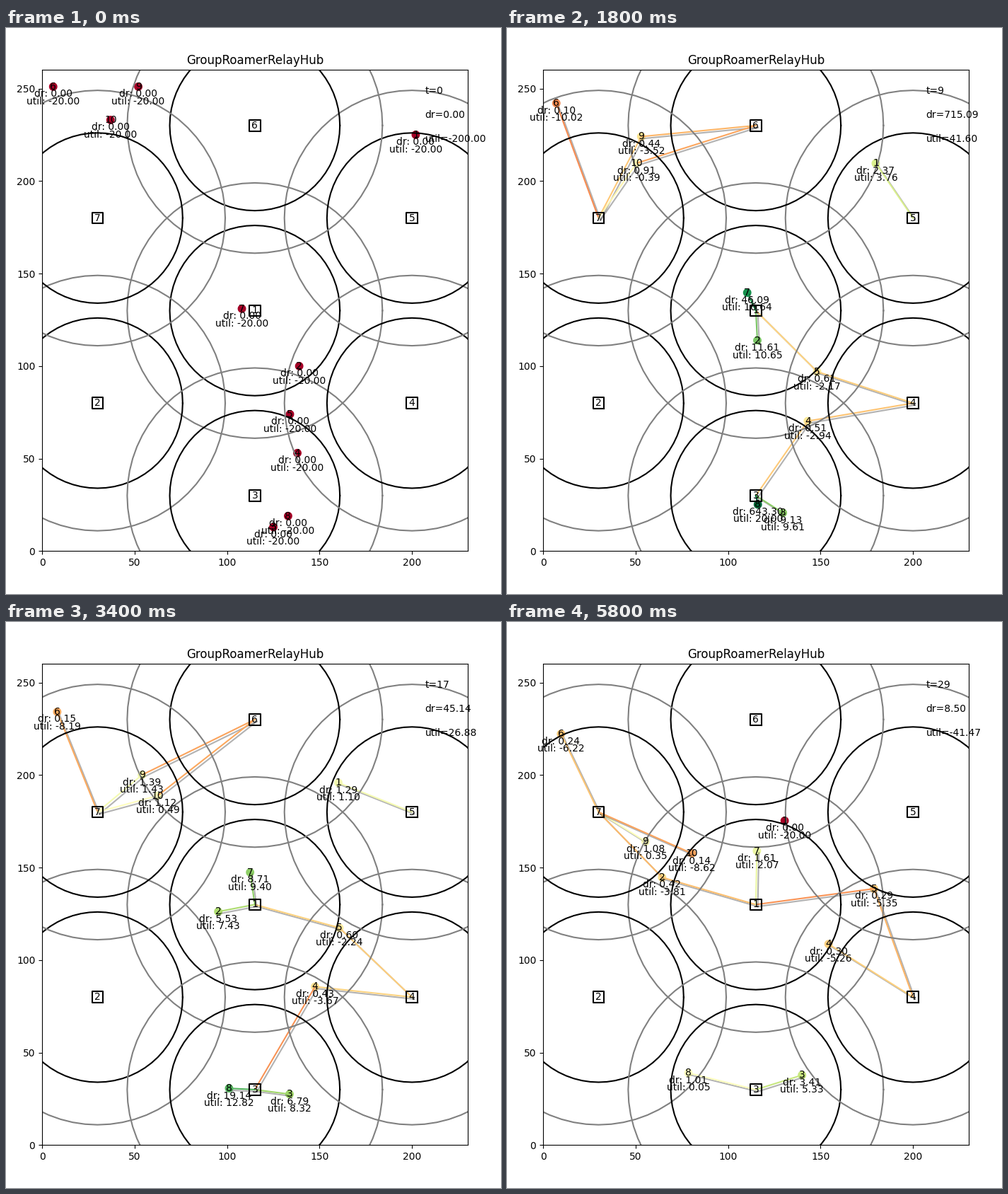
A matplotlib script that plays this animation: 700x800 px, repeating every 6 s.

```python
import math

import matplotlib.pyplot as plt
import numpy as np
from matplotlib import patheffects as pe
from matplotlib.animation import FuncAnimation

W, H, STEPS = 700, 800, 30
PAUSE = 2  # steps a user rests at a waypoint

# one cell in the middle, six around it on a hexagon
CELLS = {1: (115, 130)}
for k in range(6):
    a = math.radians(210 + 60 * k)
    CELLS[k + 2] = (115 + 85 * math.cos(a) / math.cos(math.pi / 6),
                    130 + 100 * math.sin(a))

# id: (waypoints, cells the user may join)
USERS = {
    1: ([(202, 225), (130.6, 175.29)], {5}),
    2: ([(139, 100), (64.34, 144.67)], {1, 7}),
    3: ([(125, 13), (139.98, 37.83)], {3}),
    4: ([(138, 53), (154.33, 108.65)], {3, 4}),
    5: ([(134, 74), (166, 126), (178.88, 138.57)], {1, 4}),
    6: ([(6, 251), (9.69, 222.24)], {7}),
    7: ([(108, 131), (115.59, 158.99)], {1}),
    8: ([(133, 19), (78.55, 38.99)], {3}),
    9: ([(52, 251), (55.36, 164.07)], {6, 7}),
    10: ([(37, 233), (80.47, 157.64)], {6, 7}),
}

# radio model: Okumura-Hata path loss
FREQ, MAST, PHONE = 2500, 50, 1.5
POWER, NOISE, BAND = 30, 1e-9, 9e6
MIN_SNR = 2e-8


def snr(dist):
    lf, lh = math.log10(FREQ), math.log10(MAST)
    corr = 0.8 + (1.1 * lf - 0.7) * PHONE - 1.56 * lf
    loss = (69.55 + 26.16 * lf - 13.82 * lh - corr
            + (44.9 - 6.55 * lh) * math.log10(dist))
    return 10 ** ((POWER - loss) / 10) / NOISE


def utility(rate):
    return min(20, max(-20, 10 * math.log10(rate))) if rate > 0 else -20


def position(uid, t):
    """Walk from waypoint to waypoint at a whole-number speed."""
    points = USERS[uid][0]
    legs = [(p, q, math.dist(p, q)) for p, q in zip(points, points[1:])]
    speed = round(sum(leg[2] for leg in legs) / (STEPS - 1))
    for p, q, length in legs:
        f = min(1, speed * t / length)
        spent = math.ceil(length / speed) + PAUSE
        if t <= spent:
            break
        t -= spent
    return p[0] + f * (q[0] - p[0]), p[1] + f * (q[1] - p[1])


def link_snr(uid, cell, t):
    return snr(math.dist(position(uid, t), CELLS[cell]))


def simulate():
    """For every step: {user: {cell: data rate}}."""
    links = {u: set() for u in USERS}
    history = []
    for t in range(STEPS):
        for u, (_, allowed) in USERS.items():
            if t > 0:
                # one new cell per step, strongest first
                free = [c for c in allowed - links[u]
                        if link_snr(u, c, t - 1) > MIN_SNR]
                if free:
                    links[u].add(max(free, key=lambda c: link_snr(u, c, t - 1)))
            links[u] = {c for c in links[u] if link_snr(u, c, t) > MIN_SNR}
        # users of a cell share its bandwidth
        load = {c: sum(c in s for s in links.values()) for c in CELLS}
        history.append({
            u: {c: BAND * math.log2(1 + link_snr(u, c, t)) / load[c]
                for c in sorted(links[u])}
            for u in USERS})
    return history


HISTORY = simulate()

fig = plt.figure(figsize=(W / 100, H / 100), dpi=100, facecolor="white")
ax = fig.add_axes([51.05 / W, 60.58 / H, 601.6 / W, 680.07 / H])
ax.set(xlim=(0, 230), ylim=(0, 260),
       xticks=range(0, 201, 50), yticks=range(0, 251, 50))
ax.set_title("GroupRoamerRelayHub")

cmap = plt.get_cmap("RdYlGn")
norm = plt.Normalize(-20, 20)


def shade(rate):
    return cmap(norm(utility(rate)))


def ring(x, y, r):
    a = -np.linspace(0, 2 * np.pi, 65)
    return x + r * np.cos(a), y + r * np.sin(a)


def label(x, y, s):
    return ax.text(x, y, s, ha="center", va="center")


for cid, (cx, cy) in CELLS.items():
    ax.plot(cx + np.array([3, 3, -3, -3, 3]),
            cy + np.array([-3, 3, 3, -3, -3]), color="black")
    ax.plot(*ring(cx, cy, 46), color="black")
    ax.plot(*ring(cx, cy, 69), color="gray")
    label(cx, cy, cid)

stats = [ax.text(0.9, y, "", transform=ax.transAxes) for y in (0.95, 0.9, 0.85)]
moving = []


def draw_user(uid, t):
    x, y = position(uid, t)
    rates = HISTORY[t][uid]
    rate = sum(rates.values())
    util = utility(rate)
    moving.extend(ax.fill(*ring(x, y, 2), color=shade(rate)))
    for c, r in rates.items():
        cx, cy = CELLS[c]
        moving.extend(ax.plot(
            [x, cx], [y, cy], color=shade(r), zorder=1.9,
            path_effects=[pe.SimpleLineShadow(), pe.Normal()]))
    moving.extend([label(x, y, uid),
                   label(x, y - 4, f"dr: {rate:.2f}"),
                   label(x, y - 8, f"util: {util:.2f}")])
    return rate, util


def update(t):
    while moving:
        moving.pop().remove()
    rates, utils = zip(*(draw_user(u, t) for u in USERS))
    stats[0].set_text(f"t={t}")
    stats[1].set_text(f"dr={sum(rates):.2f}")
    stats[2].set_text(f"util={sum(utils):.2f}")
    return moving + stats


anim = FuncAnimation(fig, update, frames=STEPS, interval=200,
                     init_func=lambda: stats, repeat=True, repeat_delay=0,
                     blit=False)
plt.show()
```
